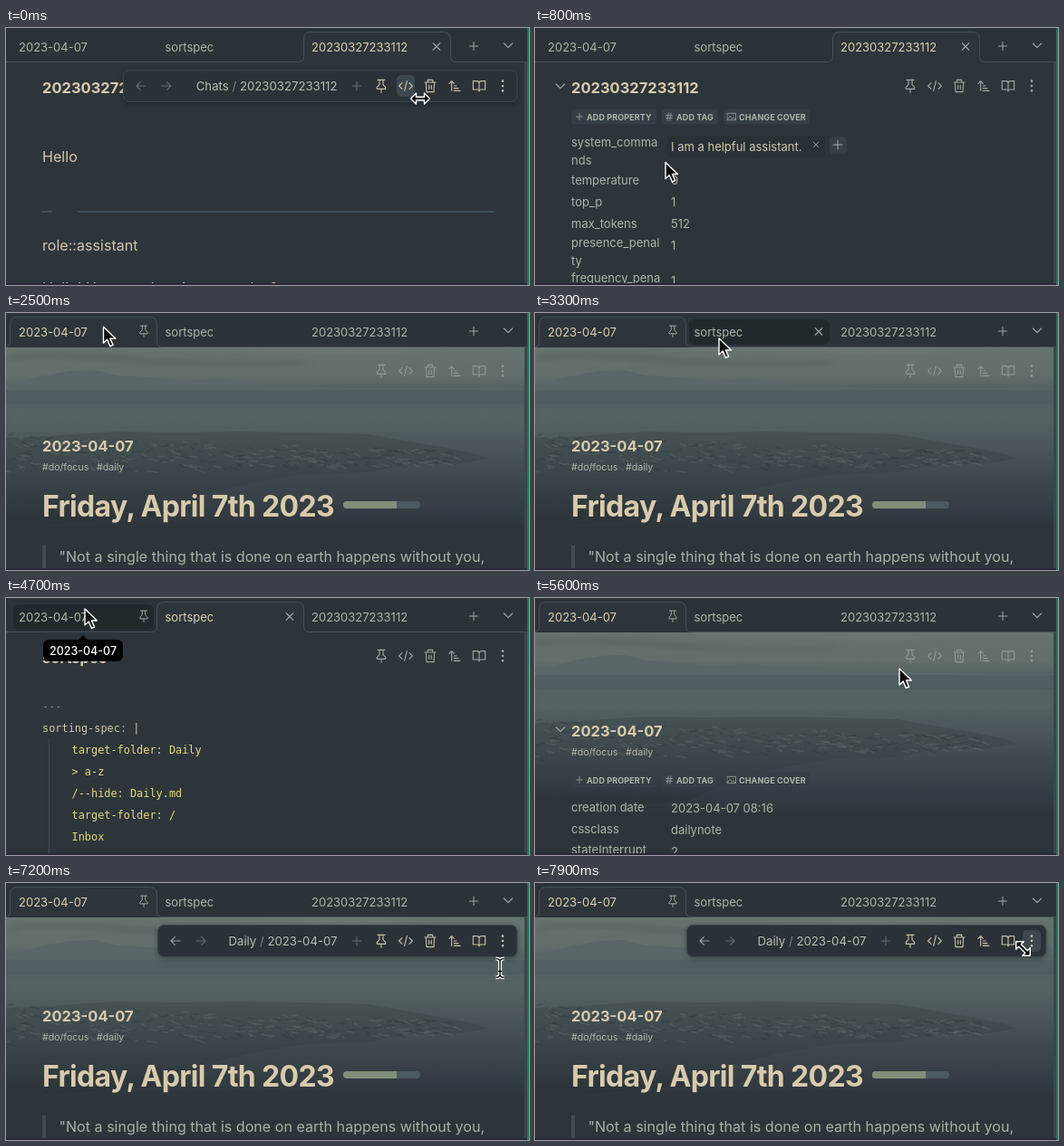
Animation of 577x284 px, one loop 8 s. Source, as an HTML page:

```html
<!DOCTYPE html>
<html lang="en">
<head>
<meta charset="utf-8">
<title>Tabs and header</title>
<style>
  html, body { margin: 0; width: 100%; height: 100%; overflow: hidden; background: #2d353b; }
  svg#stage { display: block; width: 577px; height: 284px; }
  text { font: 13px Inter, sans-serif; fill: #adb4a8; dominant-baseline: central; white-space: pre; }
  .body { font-size: 16.100px; fill: #d3c6aa; }
  .title { font-size: 16.5px; font-weight: 700; fill: #d8caac; }
  .big { font-size: 32px; font-weight: 700; letter-spacing: -.02em; fill: #d8caac; }
  .tag { font-size: 10.6px; fill: #b4b9a9; }
  .chip { font-size: 9px; font-weight: 700; letter-spacing: .1px; }
  .crumb { font-size: 13.2px; fill: #b9bdb0; }
  .mono { font: 11.9px "DejaVu Sans Mono", monospace; fill: #e5d97a; }
  .beige { fill: #d3c6aa; }
  .dim { fill: #7a8784; }
  .icon { fill: none; stroke: #9da9a0; stroke-width: 1.7; stroke-linecap: round; stroke-linejoin: round; }
  .on .icon { stroke: #c9bfa7; }
  .photo-on .icon { stroke: #8d9993; }
  .photo-on.on .icon { stroke: #c9bfa7; }
  #tools .nav { stroke: #98a39c; }
  #tools .faint { stroke: #5f6c72; }
</style>
</head>
<body>
<svg id="stage" viewBox="0 0 577 284">
  <defs>
    <symbol id="i-pin" viewBox="0 0 24 24"><path d="M12 17v6M6 2h12M9 2v8l-4 4v3h14v-3l-4-4V2"/></symbol>
    <symbol id="i-code" viewBox="0 0 24 24"><path d="M18 7l5 5-5 5M6 7l-5 5 5 5M14 4l-4 16"/></symbol>
    <symbol id="i-trash" viewBox="0 0 24 24"><path d="M3 6h18M8 6V2h8v4M5 6l1 16h12l1-16M10 11v6M14 11v6"/></symbol>
    <symbol id="i-sort" viewBox="0 0 24 24"><path d="M3 8l4-4 4 4M7 4v16M11 12h4M11 16h7M11 20h10"/></symbol>
    <symbol id="i-book" viewBox="0 0 24 24"><path d="M12 7v14M2 4h6q4 0 4 4q0-4 4-4h6v14h-7q-3 0-3 3q0-3-3-3H2z"/></symbol>
    <symbol id="i-dots" viewBox="0 0 24 24"><path stroke-width="4" d="M12 4v.01M12 12v.01M12 20v.01"/></symbol>
    <symbol id="i-left" viewBox="0 0 24 24"><path d="M20 12H4M11 5l-7 7 7 7"/></symbol>
    <symbol id="i-right" viewBox="0 0 24 24"><path d="M4 12h16M13 5l7 7-7 7"/></symbol>
    <symbol id="i-plus" viewBox="0 0 24 24"><path d="M12 4v16M4 12h16"/></symbol>
    <symbol id="i-x" viewBox="0 0 24 24"><path d="M6 6l12 12M18 6L6 18"/></symbol>
    <symbol id="i-down" viewBox="0 0 24 24"><path d="M5 9l7 7 7-7"/></symbol>
    <symbol id="i-hash" viewBox="0 0 24 24"><path d="M4 9h16M4 15h16M10 3L8 21M16 3l-2 18"/></symbol>
    <symbol id="i-image" viewBox="0 0 24 24"><path d="M2 4h20v16H2zM2 18l6-7 5 6 3-3 6 5M16 9v.01"/></symbol>

    <linearGradient id="sky" x1="0" y1="38" x2="0" y2="238" gradientUnits="userSpaceOnUse">
      <stop offset="0" stop-color="#66726f"/><stop offset=".16" stop-color="#626e6c"/>
      <stop offset=".22" stop-color="#566365"/><stop offset=".45" stop-color="#515e60"/>
      <stop offset=".7" stop-color="#3f4a4f"/><stop offset="1" stop-color="#2d353b"/>
    </linearGradient>
    <linearGradient id="rock" x1="0" y1="130" x2="0" y2="225" gradientUnits="userSpaceOnUse">
      <stop offset="0" stop-color="#465254"/><stop offset=".5" stop-color="#3b464a"/>
      <stop offset="1" stop-color="#2d353b"/>
    </linearGradient>
    <filter id="soft"><feGaussianBlur stdDeviation="6 2"/></filter>
    <filter id="shadow" x="-5%" y="-20%" width="110%" height="160%">
      <feDropShadow dx="0" dy="2" stdDeviation="3" flood-opacity=".3"/>
    </filter>
    <clipPath id="chatClip"><rect x="0" y="84" width="572" height="0"/></clipPath>
    <clipPath id="dailyClip"><rect x="0" y="186" width="572" height="0"/></clipPath>
  </defs>

  <rect width="577" height="284" fill="#2d353b"/>

  <g id="chat">
    <text class="title" x="40" y="66">20230327233112</text>
    <g class="props" clip-path="url(#chatClip)"></g>
    <g class="rest">
      <text class="body" x="40" y="142">Hello</text>
      <path d="M40 203H51M79 203H538" stroke="#475a60" stroke-width="1.6"/>
      <text class="body" x="40" y="240">role::assistant</text>
      <text class="body" x="40" y="287">Hello! How can I assist you today?</text>
    </g>
  </g>

  <g id="sort">
    <text class="title" x="40" y="66">sortspec</text>
    <path d="M47.5 156V284" stroke="#3f4a50"/>
    <text class="mono dim" x="40" y="120">---</text>
    <text class="mono beige" x="40" y="144">sorting-spec<tspan fill="#8f9a93">:</tspan> |</text>
  </g>

  <g id="daily">
    <g id="photo">
      <rect y="37" width="572" height="247" fill="url(#sky)"/>
      <g filter="url(#soft)" opacity=".5">
        <path d="M0 46Q80 40 150 48T330 52V58Q200 62 110 54T0 56z" fill="#566261"/>
        <path d="M180 38H480Q420 48 330 44T180 42z" fill="#727d78"/>
      </g>
      <path d="M0 82L22 74 48 68 72 64 98 63 122 69 160 71 190 75 240 73 290 79 345 82 572 84V88H0z" fill="#5a6768"/>
      <path d="M0 85H572V101H0z" fill="#4f5c60" opacity=".7"/>
      <path d="M0 106H572V124H0z" fill="#5a6767" opacity=".4" filter="url(#soft)"/>
      <path d="M0 138L50 136 120 131 190 132 260 131 330 132 400 134 440 141 480 148 520 156 532 161 500 166 440 168 400 176 330 178 280 186 220 200 170 224 0 238z" fill="url(#rock)"/>
    </g>
    <text class="title" x="40" y="147">2023-04-07</text>
    <text class="tag" x="40" y="170">#do/focus</text>
    <text class="tag" x="100" y="170">#daily</text>
    <g class="props" clip-path="url(#dailyClip)"></g>
    <g class="rest">
      <text class="big" x="40" y="213.5">Friday, April 7th 2023</text>
      <rect x="372" y="208" width="85" height="8" rx="4" fill="#4a5a60"/>
      <path d="M376 208H431V216H376a4 4 0 0 1 0-8z" fill="#7f8f78"/>
      <rect x="40" y="257" width="4" height="60" fill="#414c52"/>
      <text class="body" x="58.5" y="269" style="fill:#a9b1a6">"Not a single thing that is done on earth happens without you,</text>
    </g>
  </g>

  <g id="tools">
    <g id="bar">
      <rect id="frame" y="46.5" height="35" rx="7" fill="#2b3339" stroke="#3b464c" filter="url(#shadow)"/>
      <rect id="hover" y="52" width="20" height="24" rx="5" fill="#3d484e"/>
      <text class="crumb" x="365.5" y="64" text-anchor="end"><tspan id="folder"></tspan><tspan class="dim"> / </tspan><tspan id="file"></tspan></text>
    </g>
  </g>

  <g id="tabs">
    <rect width="577" height="38" fill="#2b3338"/>
    <rect id="tabHover" y="7" width="155" height="28" rx="6" fill="#22292d"/>
    <path id="tabShape" fill="#2d353b" stroke="#465157"/>
  </g>

  <g id="tip">
    <path d="M79 47L85 41 91 47z"/>
    <rect x="41" y="46" width="88" height="24" rx="6"/>
    <text x="85" y="58" text-anchor="middle" style="font-size:12.5px;font-weight:500;fill:#fff">2023-04-07</text>
  </g>

  <path d="M573.5 38V284" stroke="#3b464b" stroke-width="3"/>
  <path d="M576 0V284" stroke="#177a57" stroke-width="2"/>
  <path d="M0 283H575" stroke="#2a2838" stroke-width="2"/>

  <g id="cursor" stroke="#fff" stroke-width="1.4" stroke-linejoin="round" fill="#0b0b0b">
    <path data-shape="arrow" d="M0 0V18l4.200-4 3.200 7.500 3.200-1.400-3.200-7.100h6z"/>
    <path data-shape="ew" d="M-10.500 0l6-6v4.200h9v-4.200l6 6-6 6v-4.200h-9v4.200z"/>
    <path data-shape="nwse" transform="rotate(45)" d="M-11 0l6-6v4.200h10v-4.200l6 6-6 6v-4.200h-10v4.200z"/>
    <g data-shape="beam" fill="none" transform="scale(1.150)">
      <path id="beam" stroke-width="3.4" d="M-4-9q4 0 4 3V6q0 3-4 3M4-9q-4 0-4 3M4 9q-4 0-4-3M-2 3H2"/>
      <use href="#beam" style="display:none"/>
      <path stroke="#0b0b0b" stroke-width="1.2" d="M-4-9q4 0 4 3V6q0 3-4 3M4-9q-4 0-4 3M4 9q-4 0-4-3M-2 3H2"/>
    </g>
  </g>
</svg>

<script>
const LOOP = 8000, STEP = 100;
const $ = s => document.querySelector(s);

function add(parent, tag, attrs, content = '') {
  const el = document.createElementNS('http://www.w3.org/2000/svg', tag);
  for (const k in attrs) el.setAttribute(k, attrs[k]);
  el.textContent = content;
  return parent.appendChild(el);
}
const icon = (parent, name, x, y, size = 16, cls = '') =>
  add(parent, 'use', { href: '#i-' + name, x: x - size / 2, y: y - size / 2, width: size, height: size, class: 'icon ' + cls });
const label = (parent, x, y, str, cls = '') => add(parent, 'text', { x, y, class: cls }, str);
const show = (el, on) => el.style.display = on ? '' : 'none';

// Property panels
function chips(g, y) {
  const list = [[40, 94, 'plus', 'ADD PROPERTY', 57], [140, 62, 'hash', 'ADD TAG', 156], [208, 95, 'image', 'CHANGE COVER', 225]];
  for (const [x, w, name, str, tx] of list) {
    add(g, 'rect', { x, y: y - 8.5, width: w, height: 17, rx: 4, fill: '#353f45' });
    icon(g, name, tx - 8, y, 11);
    label(g, tx, y + .5, str, 'chip');
  }
}
function property(g, key, y, value, vy) {
  label(g, 40, y, key);
  if (value) label(g, 150, vy, value);
}
const chatProps = $('#chat .props'), dailyProps = $('#daily .props');
chips(chatProps, 98);
add(chatProps, 'rect', { x: 146, y: 119, width: 174, height: 24, rx: 4, fill: '#293136' });
label(chatProps, 150, 130.5, 'I am a helpful assistant.', 'beige');
icon(chatProps, 'x', 310, 129, 12);
add(chatProps, 'rect', { x: 325, y: 120, width: 19, height: 19, rx: 4, fill: '#353f45' });
icon(chatProps, 'plus', 334, 129, 15);
[['system_comma', 126], ['nds', 146], ['temperature', 168, '0', 168], ['top_p', 192, '1', 192], ['max_tokens', 216, '512', 216],
 ['presence_penal', 237, '1', 240], ['ty', 257], ['frequency_pena', 276, '1', 279]].forEach(row => property(chatProps, ...row));

chips(dailyProps, 201);
[['creation date', 231, '2023-04-07 08:16', 232], ['cssclass', 255, 'dailynote', 256], ['stateInterrupt', 278, '2', 280]]
  .forEach(row => property(dailyProps, ...row));

const chatFold = icon($('#chat'), 'down', 28, 64, 16);
const dailyFold = icon($('#daily'), 'down', 28, 145, 16);

['target-folder: Daily', '> a-z', '/--hide: Daily.md', 'target-folder: /', 'Inbox', 'Scratchpad']
  .forEach((str, i) => label($('#sort'), 72.5, 168 + 24 * i, str, 'mono'));

// Rock texture on the headland
let seed = 7;
const rnd = () => (seed = seed * 16807 % 2147483647) / 2147483647;
for (let i = 0; i < 260; i++) {
  const x = rnd() * 500, y = 135 + x * .035 + rnd() * (44 - x * .06), w = 3 + rnd() * 9;
  add($('#photo'), 'path', { d: `M${x} ${y}l${w} ${rnd() * 6 - 2}`, stroke: rnd() < .5 ? '#2c3539' : '#687471', 'stroke-width': 1.5, opacity: .32 });
}

// Toolbar
const actions = [414, 441, 468, 495, 522, 548];
const back = icon($('#bar'), 'left', 0, 64, 15, 'nav'), next = icon($('#bar'), 'right', 0, 64, 15, 'faint');
icon($('#bar'), 'plus', 387, 64, 15, 'faint');
['pin', 'code', 'trash', 'sort', 'book', 'dots'].forEach((name, i) => icon($('#tools'), name, actions[i], 64));

// Tab strip
const names = ['2023-04-07', 'sortspec', '20230327233112'];
const tabText = names.map((str, i) => label($('#tabs'), [14, 175.5, 337][i], 20.5, str));
const tabX = i => 4 + 162 * i;
const tabPin = icon($('#tabs'), 'pin', 152, 20, 14);
const closer = [null, icon($('#tabs'), 'x', 313, 20.5, 15), icon($('#tabs'), 'x', 475, 20.5, 15)];
icon($('#tabs'), 'plus', 516, 20, 14);
icon($('#tabs'), 'down', 554, 19, 16);

// Timelines: [time, value...]
const path = [[0, 457, 78], [100, 440, 86], [300, 300, 104], [500, 120, 78], [900, 152, 172], [1000, 152, 170], [1400, 165, 77],
  [1800, 522, 56], [2000, 440, 62], [2400, 110, 15], [2800, 100, 16], [3200, 198, 27], [3300, 203, 28], [4200, 203, 28],
  [4600, 92, 12], [4700, 87, 12], [4900, 87, 12], [5200, 110, 148], [5300, 140, 146], [5600, 402, 78], [5800, 414, 66],
  [6200, 470, 66], [6500, 534, 68], [6700, 450, 70], [6900, 462, 108], [7000, 480, 106], [7200, 545, 94], [7400, 548, 72],
  [7600, 420, 72], [7900, 538.5, 72.5]];
const shapes = [[0, 'ew'], [200, 'arrow'], [1300, 'nwse'], [1600, 'arrow'], [6800, 'beam'], [7300, 'arrow'], [7900, 'nwse']];
const activeTab = [[0, 2], [2500, 0], [3500, 1], [4800, 0]];
const barFade = [[0, 1], [100, 1], [300, 0], [1800, 0], [2000, 1], [2200, 1], [2400, 0], [5600, 0], [5800, 1],
  [6700, 1], [6900, 0], [7000, 0], [7200, 1]];
const chatOpen = [[400, 0], [800, 1], [1800, 1], [2100, 0]];
const dailyOpen = [[5000, 0], [5400, 1], [5600, 1], [5800, 0]];

const last = (keys, t) => keys.filter(k => k[0] <= t).pop()[1];
function tween(keys, t, col = 1) {
  const i = keys.findIndex(k => k[0] > t);
  if (i === 0) return keys[0][col];
  if (i < 0) return keys[keys.length - 1][col];
  const a = keys[i - 1], b = keys[i];
  return a[col] + (b[col] - a[col]) * (t - a[0]) / (b[0] - a[0]);
}

function fold(id, arrow, amount, height) {
  $(`#${id}Clip rect`).setAttribute('height', amount * height);
  $(`#${id} .rest`).setAttribute('transform', `translate(0 ${amount * height})`);
  arrow.style.opacity = amount;
}

function drawTabs(tab, x, y) {
  const a = tabX(tab) + .5, b = a + 162;
  $('#tabShape').setAttribute('d', `M-9 37.5H${a - 6}q6 0 6-6V12.5q0-8 8-8H${b - 8}q8 0 8 8V31.5q0 6 6 6H578`);
  const over = y < 36 ? Math.floor((x - 4) / 162) : -1;
  const hovered = over >= 0 && over < 3 && over !== tab ? over : -1;
  show($('#tabHover'), hovered >= 0);
  $('#tabHover').setAttribute('x', tabX(hovered) + 4);
  tabText.forEach((el, i) => el.style.fill = i === tab ? '#dccfac' : '');
  closer.forEach((el, i) => el && show(el, i === tab || i === hovered));
}

function drawTools(t, tab, x, y) {
  const alpha = tween(barFade, t), left = tab === 2 ? 129.5 : 167.5;
  $('#bar').style.opacity = alpha;
  $('#tools').setAttribute('class', (tab === 0 ? 'photo-on ' : '') + (alpha > .5 ? 'on' : ''));
  $('#frame').setAttribute('x', left);
  $('#frame').setAttribute('width', 564 - left);
  back.setAttribute('x', left + 12);
  next.setAttribute('x', left + 40);
  back.classList.toggle('faint', tab === 2);
  $('#folder').textContent = tab === 2 ? 'Chats' : 'Daily';
  $('#file').textContent = names[tab];
  const spot = t < STEP ? 441 : y > 50 && y < 80 && actions.find(ax => Math.abs(ax - x) < 13);
  show($('#hover'), spot);
  if (spot) $('#hover').setAttribute('x', spot - 10);
}

function render(t) {
  const tab = last(activeTab, t), x = tween(path, t, 1), y = tween(path, t, 2), shape = last(shapes, t);
  ['#daily', '#sort', '#chat'].forEach((id, i) => show($(id), i === tab));
  show(tabPin, t >= 2500);
  show($('#tip'), t >= 4600 && t < 4800);
  fold('chat', chatFold, tween(chatOpen, t), 215);
  fold('daily', dailyFold, tween(dailyOpen, t), 110);
  drawTabs(tab, x, y);
  drawTools(t, tab, x, y);
  $('#cursor').setAttribute('transform', `translate(${x} ${y})`);
  document.querySelectorAll('[data-shape]').forEach(el => show(el, el.dataset.shape === shape));
}

let start;
function tick(now) {
  start ??= now;
  render(Math.floor((now - start) % LOOP / STEP) * STEP);
  requestAnimationFrame(tick);
}
render(0);
requestAnimationFrame(tick);
</script>
</body>
</html>
```
